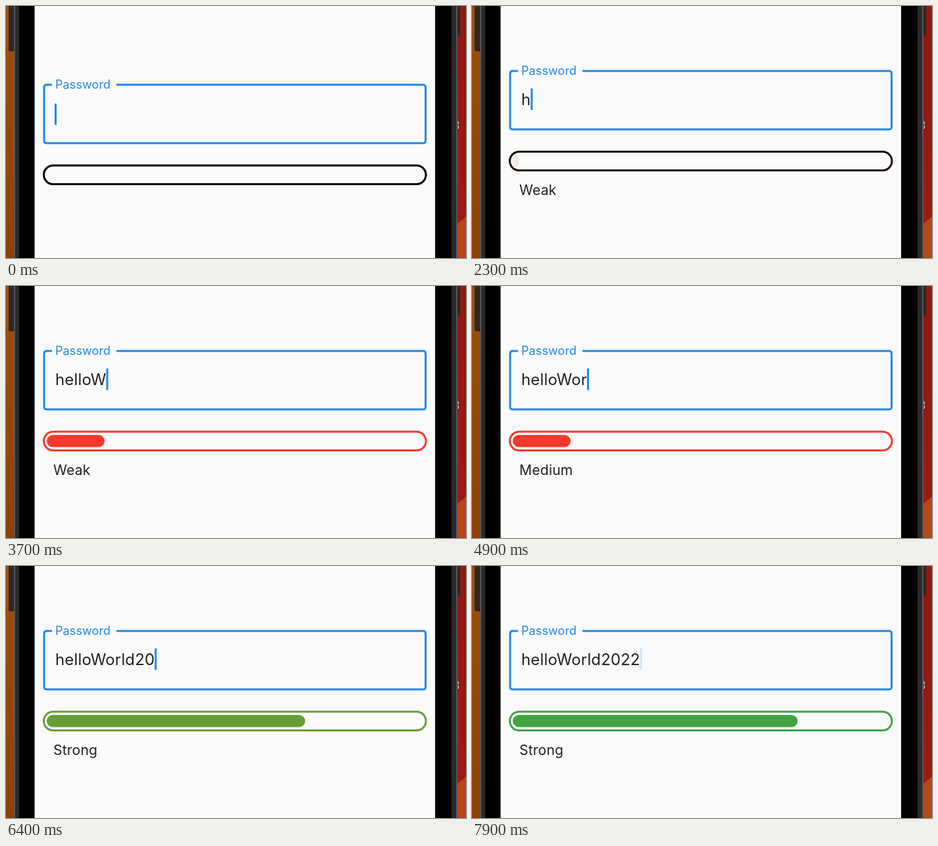
An HTML page for the animation above (8000 ms loop, 700x384 px).

```html
<!DOCTYPE html>
<html lang="en">
<head>
<meta charset="utf-8">
<title>Password strength</title>
<style>
  html, body { margin: 0; width: 100%; height: 100%; overflow: hidden; background: #000; }
  svg { display: block; width: 100vw; height: 100vh; }
  text { font-family: Inter, Roboto, sans-serif; fill: #212121; white-space: pre; }
</style>
</head>
<body>
<svg viewBox="0 0 700 384">
  <defs>
    <linearGradient id="amber" x2="0" y2="1">
      <stop stop-color="#9c5008"/><stop offset="1" stop-color="#8c4102"/>
    </linearGradient>
    <linearGradient id="crimson" x2="0" y2="1">
      <stop stop-color="#8c1912"/><stop offset="1" stop-color="#a01a14"/>
    </linearGradient>
  </defs>

  <rect width="14" height="384" fill="url(#amber)"/>
  <rect x="684" width="16" height="384" fill="url(#crimson)"/>
  <path d="M684 334L700 321V384H684Z" fill="#b4481a"/>
  <text x="680" y="188" font-size="17" font-weight="600" style="fill:#c9c4c2" stroke="#3a2020" stroke-width=".6">3</text>
  <path d="M4 0H14V69H7Q4 69 4 66Z" fill="#2b2724"/>
  <path d="M684 0H691V42Q691 45 688 45H684Z" fill="#2b2724"/>
  <rect x="12" width="675" height="384" fill="#56565a"/>
  <rect x="14" width="671" height="384" fill="#2a2a2c"/>
  <rect x="20" width="658" height="384" fill="#000"/>
  <rect x="43.5" width="609.5" height="384" fill="#fafafa"/>

  <g id="form">
    <path d="M70 120H62Q58 120 58 124V205Q58 209 62 209H634.5Q638.5 209 638.5 205V124Q638.5 120 634.5 120H168"
      fill="none" stroke="#1e88e8" stroke-width="3"/>
    <text x="75" y="126" font-size="18" letter-spacing=".1" style="fill:#1e88e8">Password</text>
    <rect id="track" x="57.5" y="243" width="581.5" height="28.5" rx="14.25" fill="none" stroke-width="3"/>
    <rect id="fill" x="62" y="248" height="18.5" rx="9.25"/>
  </g>
  <text id="entry" x="75" y="151" font-size="24" letter-spacing=".15"></text>
  <text id="grade" x="72" y="288" font-size="21.2" letter-spacing=".15"></text>
  <rect id="caret" y="125.5" width="3" height="33" rx="1" fill="#1e88e8"/>
</svg>
<script>
const LOOP = 8000, STEP = 100, FADE = 130;
const $ = id => document.getElementById(id);
const form = $('form'), track = $('track'), fill = $('fill');
const entry = $('entry'), grade = $('grade'), caret = $('caret');

const word = 'helloWorld2022';
const keys = [2250, 2500, 2800, 2900, 3200, 3700, 4600, 4900, 5050, 5160, 6000, 6400, 6900, 7295];
const grades = [
  { at: -LOOP, name: '', level: 0, rgb: [0, 0, 0] },
  { at: 2250, name: 'Weak', level: 0.15, rgb: [242, 58, 44] },
  { at: 4900, name: 'Medium', level: 0.4, rgb: [252, 140, 0] },
  { at: 6000, name: 'Strong', level: 0.75, rgb: [65, 163, 67] }
];

const clamp = v => Math.max(0, Math.min(1, v));
const lerp = (a, b, p) => a + (b - a) * p;
const set = (el, attrs) => { for (const k in attrs) el.setAttribute(k, attrs[k]); };

// Solid for half a second after a key, then a soft one-second blink.
function caretOpacity(since) {
  const p = since % 1000;
  return p < 850 ? 1 - clamp((p - 500) / FADE) : clamp((p - 850) / FADE);
}

function draw(t) {
  const typed = keys.filter(k => k <= t).length;
  const lift = typed ? -21 : 0;
  set(form, { transform: `translate(0 ${lift})` });

  entry.textContent = word.slice(0, typed);
  const end = typed ? entry.getComputedTextLength() : -1;
  set(caret, {
    x: 75 + end,
    y: typed ? 125.5 : 148.5,
    opacity: caretOpacity(typed ? t - keys[typed - 1] : t + 440)
  });

  const i = grades.filter(g => g.at <= t).length - 1;
  const now = grades[i], prev = grades[Math.max(0, i - 1)];
  const p = clamp((t - now.at) / 500);
  const color = `rgb(${now.rgb.map((c, n) => Math.round(lerp(prev.rgb[n], c, p)))})`;
  const level = lerp(prev.level, now.level, p);
  grade.textContent = now.name;
  set(track, { stroke: color });
  set(fill, {
    width: level ? 1.7 + 575.7 * level : 0,
    fill: i === 1 ? `rgb(${now.rgb})` : color,
    opacity: i === 1 ? p : 1
  });
}

const start = performance.now();
function tick() {
  const t = (performance.now() - start) % LOOP;
  draw(Math.floor(t / STEP) * STEP);
  requestAnimationFrame(tick);
}
tick();
</script>
</body>
</html>
```
